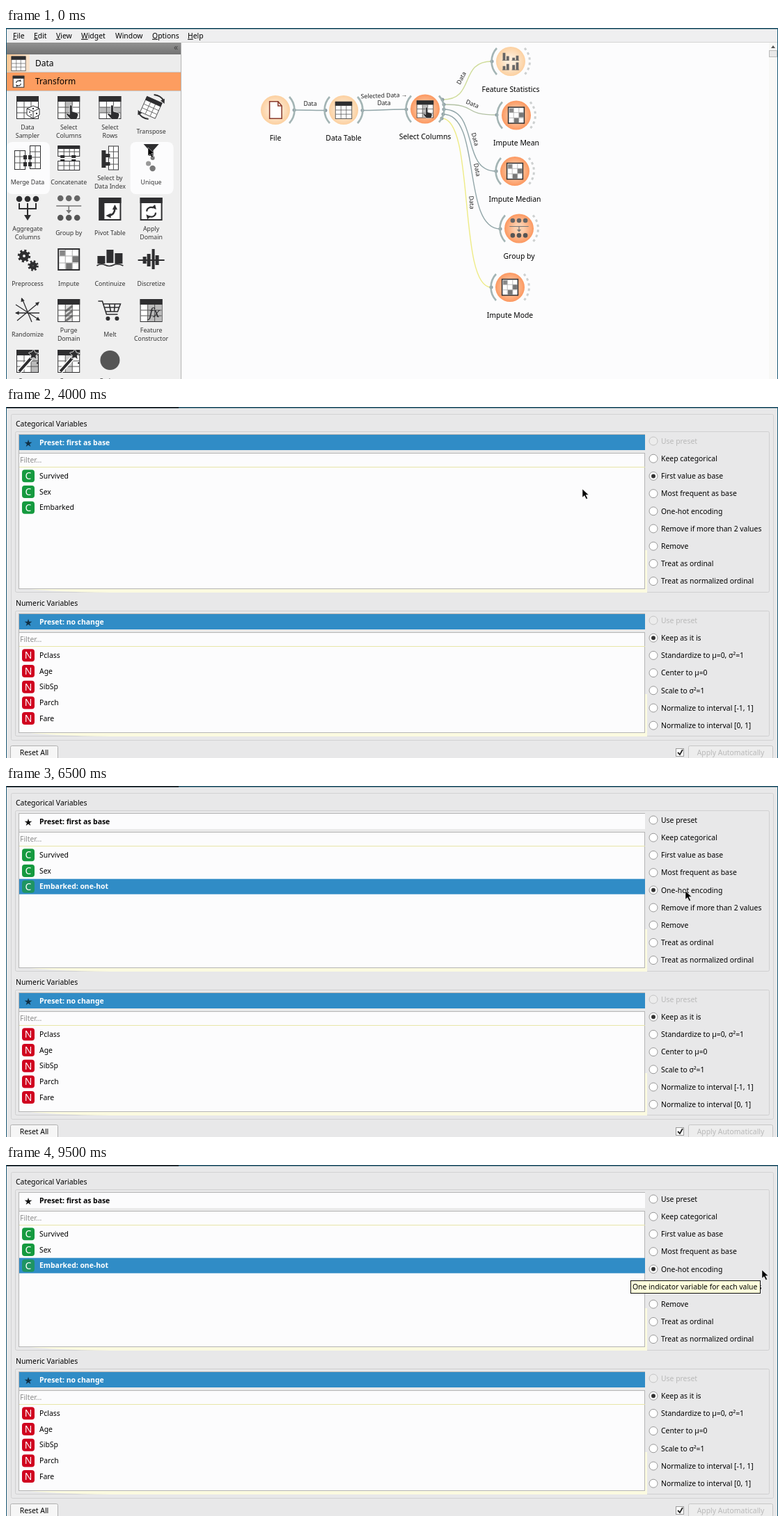
Animation, 1109 px wide and 505 px high, one loop 10000 ms. Source, as an HTML page:

```html
<!DOCTYPE html>
<html lang="en">
<head>
<meta charset="utf-8">
<title>Continuize</title>
<style>
html, body { margin: 0; width: 100%; height: 100%; overflow: hidden; background: #fcfcfd; }
svg { display: block; width: 100vw; height: 100vh; font-family: "Noto Sans", "Open Sans", sans-serif; }
</style>
</head>
<body>
<svg viewBox="0 0 1109 505" preserveAspectRatio="none">
  <defs>
    <radialGradient id="pale"><stop offset=".3" stop-color="#fdecd8"/><stop offset="1" stop-color="#fcd0a0"/></radialGradient>
    <radialGradient id="warm"><stop offset=".3" stop-color="#fdcfae"/><stop offset="1" stop-color="#fc9860"/></radialGradient>
    <radialGradient id="hot"><stop offset=".2" stop-color="#fd8a40"/><stop offset="1" stop-color="#f46a15"/></radialGradient>
    <linearGradient id="bar" x2="0" y2="1"><stop stop-color="#929292"/><stop offset="1" stop-color="#737373"/></linearGradient>
    <linearGradient id="tab"><stop stop-color="#fbc793"/><stop offset="1" stop-color="#f8e3cd"/></linearGradient>
  </defs>
  <g id="stage"></g>
</svg>
<script>
const INK = '#2e2e30', BLUE = '#308cc6', GREY = '#8c8c8c';

const path = (d, fill = INK, stroke = 'none', w = 1) =>
  `<path d="${d}" fill="${fill}" stroke="${stroke}" stroke-width="${w}"/>`;
const line = (d, stroke = INK, w = 1.5) => path(d, 'none', stroke, w);
const rect = (x, y, w, h, fill, stroke = 'none', r = 0) =>
  `<rect x="${x}" y="${y}" width="${w}" height="${h}" rx="${r}" fill="${fill}" stroke="${stroke}"/>`;
const dot = (x, y, r, fill = INK, stroke = 'none') =>
  `<circle cx="${x}" cy="${y}" r="${r}" fill="${fill}" stroke="${stroke}"/>`;
const at = (x, y, body, more = '') => `<g transform="translate(${x} ${y}) ${more}">${body}</g>`;
// y is the middle of the capitals
const text = (x, y, s, size = 10.4, attrs = '') =>
  `<text x="${x}" y="${y + size * .36}" font-size="${size}" ${attrs}>${s}</text>`;
const mid = (x, y, s, size, attrs = '') => text(x, y, s, size, 'text-anchor="middle" ' + attrs);

// Icons, drawn around 0,0 about 32 units wide
const table = (shade = '') => rect(-15.5, -15.5, 31, 32, '#fff', INK) + shade +
  line('M-15 0h30M-15 8h30M-5-8v24M5-8v24', '#555', 1) + path('M-16-16h32v8h-32z');
const hand = at(3, 4, path('M-2-5c0-3 4-3 4 0v7l6 1.500q3 1 2.500 4l-2 6h-9l-6-7q0-3 3-1l1.500 1z', INK, '#fff', .8));
const head = (x, y, a, size = 1) => at(x, y, path('M0 0l-8-4v8z'), `rotate(${a}) scale(${size})`);
const cycle = line('M-7 2a7 6 0 0 1 10-6M7 4a7 6 0 0 1-10 6', INK, 2.4) + head(8, -1, 50, .9) + head(-8, 7, 230, .9);
const page = path('M-15-15h30v31h-30z', '#fff', INK, 2) + path('M-16-16h32v8h-32z');
const trio = (y, c) => [-12, 0, 12].map(x => dot(x, y, 4.3, c)).join('');
const wand = line('M-12 15L5-4', '#fff', 7) + line('M-12 15L5-4', INK, 4) +
  path('M9-17l2 5 5 1-4 3 1 6-4-3-5 2 1-5-4-4 5-1z', INK, '#fff', .8) + dot(1, -13, 1.2) + dot(14, 3, 1.2);
const gear = (x, y, r) =>
  `<circle cx="${x}" cy="${y}" r="${r}" fill="none" stroke="${INK}" stroke-width="5"/>` +
  `<circle cx="${x}" cy="${y}" r="${r + 3}" fill="none" stroke="${INK}" stroke-width="3.500" stroke-dasharray="${(r + 3) * Math.PI / 8}"/>`;

const icons = {
  sampler: table() + path('M8-2l9 4v9l-9 5-9-5V2z', '#fff', INK) + line('M-1 2l9 4 9-4M8 6v10', INK, 1) +
    dot(8, 2, 1.2) + dot(3, 7, 1) + dot(5, 11, 1) + dot(13, 9, 1.2),
  columns: table(rect(-5, -8, 10, 24, '#bbb')) + hand,
  rows: table(rect(-15, 0, 30, 8, '#bbb')) + hand,
  transpose: at(0, 0, table(), 'rotate(24) scale(.76)') +
    line('M4-18q10 1 14 9M-4 17q-10-1-14-9', INK, 1.8) + head(19, -5, 65, .8) + head(-19, 4, 245, .8),
  merge: rect(-18.5, -10.5, 15, 27, '#fff', INK) + rect(3.5, -17.5, 15, 33, '#fff', INK) +
    line('M-18-2h15M-18 7h15M-11-10v27M4-9h15M4-1h15M4 7h15M11-17v33', '#555', 1) +
    path('M-6-4h5v6h-5zM-6 6h5v6h-5zM1-4h5v6H1zM1 6h5v6H1z'),
  concat: rect(-15.5, -16.5, 31, 14, '#fff', INK) + rect(-15.5, 4.5, 31, 13, '#fff', INK) +
    line('M-15-9h30M-15 11h30M-7-16v13M1-16v13M8-16v13M-7 4v13M1 4v13M8 4v13', '#555', 1) +
    path('M-16-18h32v5h-32zM-12-4h6v4h-6zM4-4h6v4H4zM-12 2h6v3h-6zM4 2h6v3H4z'),
  index: rect(-12, -11, 6, 25, INK) + rect(-2, -17, 14, 34, '#fff', INK) +
    line('M-2-9h14M-2 0h14M-2 9h14M5-17v34', '#555', 1) + path('M-8-6h8v5h-8zM-8 6h8v5h-8z'),
  unique: path('M-11-20h22l-8 9v8h-6v-8z') + dot(2, 0, 3, '#777') + dot(-4, 8, 3.6, '#999') + dot(2, 15, 4.2, '#777'),
  aggregate: trio(-14) + line('M-12-8v8h24v-8M0-8v20', INK, 2) + path('M-5 9h10l-5 8z'),
  group: trio(-15, '#666') + line('M-18-4h36M0-4v7', '#777', 1.5) + path('M-4 2h8l-4 5z', '#777') + trio(13, '#555'),
  pivot: page + rect(-16, -8, 8, 25, INK) + line('M-2 10q9-1 9-11', INK, 2.5) + head(7, -6, -90, .9) + head(-6, 10, 180, .9),
  domain: page + at(0, 2, cycle, 'scale(.9)'),
  preprocess: gear(-5, -5, 4.5) + gear(8, 9, 3),
  impute: path('M-15-15h30v30h-30z', '#fff', INK, 2) + rect(-13, -13, 8, 8, '#888') + rect(5, -5, 9, 9, '#777') +
    rect(-4, 5, 9, 9, '#777') + line('M-14-5h28M-14 5h28M-5-14v28M5-14v28', '#aaa', 1),
  continuize: path('M-18-5h11V6h-11zM-5-14H5V5H-5zM7-9h11V6H7z') +
    line('M-19 9q6-4 12-1t12 0 14 1', INK, 1.6),
  discretize: line('M-19 1h38', INK, 2) + path('M-12-4h5V6h-5zM-6-8h5v18h-5zM1-15h4v29H1zM6-6h5V8H6z'),
  randomize: line('M-17-8L17 14M-15 15L15-10M-8-17L6 17M-17 4h34', INK, 1.3) +
    head(18, 15, 33, .7) + head(17, -12, -40, .7) + head(-18, 4, 180, .7) + head(-9, -18, 248, .7),
  purge: table(rect(-5, -8, 10, 24, '#ddd') + line('M-5 2l10-8M-5 9L5 1M-5 16l10-8', '#777', 3)),
  melt: line('M-17-13h6l6 19h16M-9-9h24l-4 11H-6M-8-4h21M-1-9l2 11M7-9L6 2', INK, 1.6) + dot(-3, 12, 3) + dot(10, 12, 3),
  formula: table(rect(-5, -8, 20, 24, '#bbb')) +
    `<text x="-3" y="10" font-size="18" font-style="italic" font-family="Noto Serif, serif" fill="${INK}">fx</text>`,
  wandA: table(rect(5, -8, 10, 24, '#bbb')) + wand,
  wandB: table(rect(-5, -8, 10, 24, '#ccc')) + wand,
  script: dot(0, -1, 14, '#555'),
  table: table(),
  file: path('M-11-16H5l7 8v24h-23z', '#fff', '#8a3b2c', 2) + line('M5-16v8h7', '#8a3b2c', 2),
  stats: path('M-15-16h5v14h-5zM-8-10h5v8h-5zM3-7h5v5H3zM10-11h5v9h-5zM-15 9h5v7h-5zM-8 5h5v11h-5zM3 7h5v9H3zM10 2h5v14h-5z', '#666') +
    line('M-16-2h13M2-2h14M-16 16h13M2 16h14', '#666', 1)
};

const tools = [
  ['sampler', 'Data', 'Sampler'], ['columns', 'Select', 'Columns'], ['rows', 'Select', 'Rows'], ['transpose', 'Transpose'],
  ['merge', 'Merge Data'], ['concat', 'Concatenate'], ['index', 'Select by', 'Data Index'], ['unique', 'Unique'],
  ['aggregate', 'Aggregate', 'Columns'], ['group', 'Group by'], ['pivot', 'Pivot Table'], ['domain', 'Apply', 'Domain'],
  ['preprocess', 'Preprocess'], ['impute', 'Impute'], ['continuize', 'Continuize'], ['discretize', 'Discretize'],
  ['randomize', 'Randomize'], ['purge', 'Purge', 'Domain'], ['melt', 'Melt'], ['formula', 'Feature', 'Constructor'],
  ['wandA', 'Create', 'Class'], ['wandB', 'Create', 'Instance'], ['script', 'Python', 'Script']
];

const menu = [[10, 'File'], [40, 'Edit'], [72, 'View'], [108, 'Widget'], [157, 'Window'], [210, 'Options'], [261, 'Help']]
  .map(([x, s]) => text(x, 11, s == 'Window' ? s : `<tspan text-decoration="underline">${s[0]}</tspan>${s.slice(1)}`)).join('');

function sidebar(cx, cy) {
  const label = (x, y, s) => mid(x, y, s, 8.8, 'fill="#333"');
  let out = rect(1, 21, 250, 484, '#efefef') + rect(1, 21, 250, 17, 'url(#bar)') + mid(244, 27.5, '«', 12, 'fill="#444"') +
    rect(1, 38, 250, 26, '#ececec') + rect(1, 38, 33, 26, 'url(#tab)') + at(18, 51, table(), 'scale(.65)') + text(42, 51, 'Data', 12) +
    rect(1, 64, 250, 26, '#fd9d60') + at(18, 77, icons.domain, 'scale(.52)') + text(42, 77, 'Transform', 12) +
    line('M1 63.500h250M1 90.500h250', '#c9c9c9', 1) + line('M251.500 21v484', '#b4b4b4', 1);
  tools.forEach(([icon, a, b], i) => {
    const x = 31 + i % 4 * 59.2, y = 73 * (i >> 2);
    const hover = Math.abs(cx - x) < 30 && cy > y + 91 && cy < y + 164;
    if (hover || icon == 'merge') out += rect(x - 30, y + 91, 62, 75, '#fcfcfd', 'none', 8);
    out += at(x, y + 114, icons[icon]);
    out += b ? label(x, y + 143, a) + label(x, y + 155, b) : label(x, y + 149, a);
  });
  return out;
}

// Ports: 0 none, 1 solid arc, 2 dotted arc
function node(x, y, icon, label, fill, left, right, chosen) {
  const arc = (side, kind) => kind ? `<path d="M${side * 20}-19A28 28 0 0 ${side > 0 ? 1 : 0} ${side * 20} 19" fill="none" ` +
    (kind == 1 ? 'stroke="#a3b4b4" stroke-width="2.600"/>' : 'stroke="#cdd0d0" stroke-width="3" stroke-dasharray="3.500 4"/>') : '';
  return at(x, y, arc(-1, left) + arc(1, right) + dot(0, 0, 21, `url(#${fill})`) + at(0, 0, icons[icon], 'scale(.76)') +
    (chosen ? rect(-27, 30.5, 55, 18, BLUE, 'none', 3) : '') + mid(0, 39.8, label, 10.4, chosen ? 'fill="#fff"' : ''));
}

function link(x1, y1, x2, y2, color = '#91a5a8') {
  const k = (x2 - x1) * .68;
  return line(`M${x1} ${y1}C${x1 + k} ${y1} ${x2 - k} ${y2} ${x2} ${y2}`, color, 1.4) + dot(x1, y1, 2.5, '#8b9ca3') + dot(x2, y2, 2.5, '#8b9ca3');
}
const tag = (x, y, a, s = 'Data') => at(x, y, mid(0, 0, s, 8.7, 'fill="#222"'), `rotate(${a})`);

const flow = link(414, 118, 459, 118.5) + link(512, 118.5, 575, 117) +
  link(627, 103, 698, 48, '#cfdc9a') + link(629, 110, 705, 125, '#b3c2a4') + link(629, 117, 704, 206) +
  link(628, 124, 710, 289) + link(626, 130, 697, 373, '#eeeb86') +
  tag(437, 109, 0) + tag(543, 108, 0) + tag(543, 97, -2, 'Selected Data →') +
  tag(654, 72, -62) + tag(670, 109, 22) + tag(674, 160, 75) + tag(677, 204, 79) + tag(669, 251, 86) +
  node(387, 118, 'file', 'File', 'pale', 0, 1) + node(485, 118, 'table', 'Data Table', 'pale', 1, 1) +
  node(602, 116.5, 'columns', 'Select Columns', 'warm', 1, 1) + node(725, 48, 'stats', 'Feature Statistics', 'pale', 1, 2) +
  node(733, 125.5, 'impute', 'Impute Mean', 'warm', 1, 2) + node(731, 206, 'impute', 'Impute Median', 'warm', 1, 2) +
  node(737, 288.5, 'group', 'Group by', 'warm', 1, 2) + node(724, 373, 'impute', 'Impute Mode', 'warm', 1, 2);

function workspace(t, cx, cy) {
  return rect(0, 0, 1109, 505, '#fcfcfd') + rect(0, 0, 1109, 21, '#efeff0') + menu + line('M252 20.500h857', '#d5d5d5', 1) +
    sidebar(cx, cy) + flow + (t >= 1500 ? node(833, 115.5, 'continuize', 'Continuize', 'hot', 2, 2, true) : '') +
    rect(1096, 21, 12, 484, '#f8f8f6') + path('M1099 29l3-4 3 4z', '#555') + rect(1096.5, 32.5, 11, 9, '#e9e9e9', '#bbb');
}

const radio = (y, s, on, off) => dot(930, y, 6, off ? '#ececec' : '#fff', off ? '#c4c4c4' : '#9a9a9a') +
  (on ? dot(930, y, 3, '#333') : '') + text(941, y, s, 10.4, off ? 'fill="#b9b9b9"' : '');

const bold = 'font-weight="700"';

function section(o) {
  const { y, h, title, preset, letter, color, items, options, picked, chosen, suffix } = o;
  const hit = chosen >= 0;
  let out = text(14, y, title) + rect(13.5, y + 11.5, 1083, h + 9, 'none', '#cfcfd0', 2) +
    path(`M18 ${y + h + 14}Q60 ${y + h + 20} 150 ${y + h + 21}H921V${y + h - 40}H915V${y + h + 14}Z`, '#fbfae0') +
    rect(18.5, y + 15.5, 899, h, '#fcfcfd', '#b5b5b5') +
    rect(19, y + 16, 899, 23, hit ? '#fcfcfd' : BLUE) +
    mid(32, y + 27.5, '★', 14, `font-family="DejaVu Sans, sans-serif" fill="${hit ? '#111' : '#102f44'}"`) +
    text(48, y + 27.5, preset, 10.4, bold + (hit ? '' : ' fill="#fff"')) +
    rect(19, y + 38, 899, 4, '#e9e9e9') + rect(18.5, y + 42.5, 899, 20, '#fcfcfd', '#b5b5b5') + line(`M19 ${y + 62.5}h899`, '#e8e6a8', 1) +
    text(20, y + 52, 'Filter...', 10.4, `fill="${GREY}"`);
  items.forEach((s, i) => {
    const row = y + 75.3 + i * 22.7, on = i == chosen;
    if (on) out += rect(19, row - 11, 899, 22, BLUE);
    out += rect(23, row - 9, 18, 18, on ? '#1f9463' : color, 'none', 4) + mid(32, row, letter, 14, 'fill="#fff"') +
      text(48, row, s + (on ? suffix : ''), 10.4, on ? (suffix ? bold + ' ' : '') + 'fill="#fff"' : '');
  });
  options.forEach((s, i) => out += radio(y + 25 + i * 25.2, s, i == picked, !i && !hit));
  return out;
}

function dialog(t) {
  const chosen = t >= 5500 ? 2 : -1, oneHot = t >= 6500;
  let out = rect(0, 0, 1109, 505, '#e8e8e9') + rect(7.5, 10.5, 1095, 469, 'none', '#d2d2d3', 2) +
    section({
      y: 24, h: 222, title: 'Categorical Variables', preset: 'Preset: first as base', letter: 'C', color: '#159a3f',
      items: ['Survived', 'Sex', 'Embarked'], chosen, suffix: oneHot ? ': one-hot' : '', picked: oneHot ? 4 : chosen < 0 ? 2 : 0,
      options: ['Use preset', 'Keep categorical', 'First value as base', 'Most frequent as base', 'One-hot encoding',
        'Remove if more than 2 values', 'Remove', 'Treat as ordinal', 'Treat as normalized ordinal']
    }) +
    section({
      y: 282, h: 171, title: 'Numeric Variables', preset: 'Preset: no change', letter: 'N', color: '#d0021f',
      items: ['Pclass', 'Age', 'SibSp', 'Parch', 'Fare'], chosen: -1, picked: 1,
      options: ['Use preset', 'Keep as it is', 'Standardize to μ=0, σ²=1', 'Center to μ=0', 'Scale to σ²=1',
        'Normalize to interval [-1, 1]', 'Normalize to interval [0, 1]']
    }) +
    rect(6.5, 487.5, 68, 22, '#f6f6f6', '#b0b0b0', 2) + mid(40.5, 497, 'Reset All') +
    rect(962.5, 491.5, 11, 11, '#fff', '#9a9a9a') + line('M965 497l3 3 4-7', '#222', 1.8) +
    rect(980.5, 487.5, 121, 22, '#ededed', '#c6c6c6', 2) + mid(1041, 497, 'Apply Automatically', 10.4, 'fill="#b9b9b9"');
  if (t >= 8000) out += rect(897.5, 166.5, 186, 18, '#ffffdc', '#111') + text(900, 175.5, 'One indicator variable for each value');
  return out;
}

// Pointer way points: time, x, y
const way = [[0, 204, 172], [500, 150, 325], [1500, 150, 325], [2500, 802, 117], [3000, 828, 118], [4000, 828, 118],
  [5000, 53, 136], [5500, 53, 140], [6500, 976, 151], [9000, 976, 151], [9500, 1086, 151], [10000, 1086, 151]];

function pointer(t) {
  const i = way.findIndex(p => p[0] > t), [a, x, y] = way[i - 1], [b, u, v] = way[i], k = (t - a) / (b - a);
  return [x + (u - x) * k, y + (v - y) * k];
}

const stage = document.getElementById('stage');
let last = -1;

function frame(now) {
  const t = Math.floor(now % 10000 / 500) * 500;   // the screen refreshes twice a second
  if (t != last) {
    last = t;
    const [x, y] = pointer(t), open = t >= 3500;
    stage.innerHTML = (open ? dialog(t) : workspace(t, x, y)) +
      rect(0, 0, 1109, 1.5, '#0d4258') + (open ? rect(0, 0, 248, 1.5, '#0c1114') : '') +
      rect(0, 0, 1, 505, '#1d5b78') + rect(1108, 0, 1, 505, '#1d5b78') +
      at(x, y, path('M0 0v12l3-2.500 2.500 5 2-1-2.500-5h4z', '#000', '#fff', .5));
  }
  requestAnimationFrame(frame);
}
requestAnimationFrame(frame);
</script>
</body>
</html>
```
